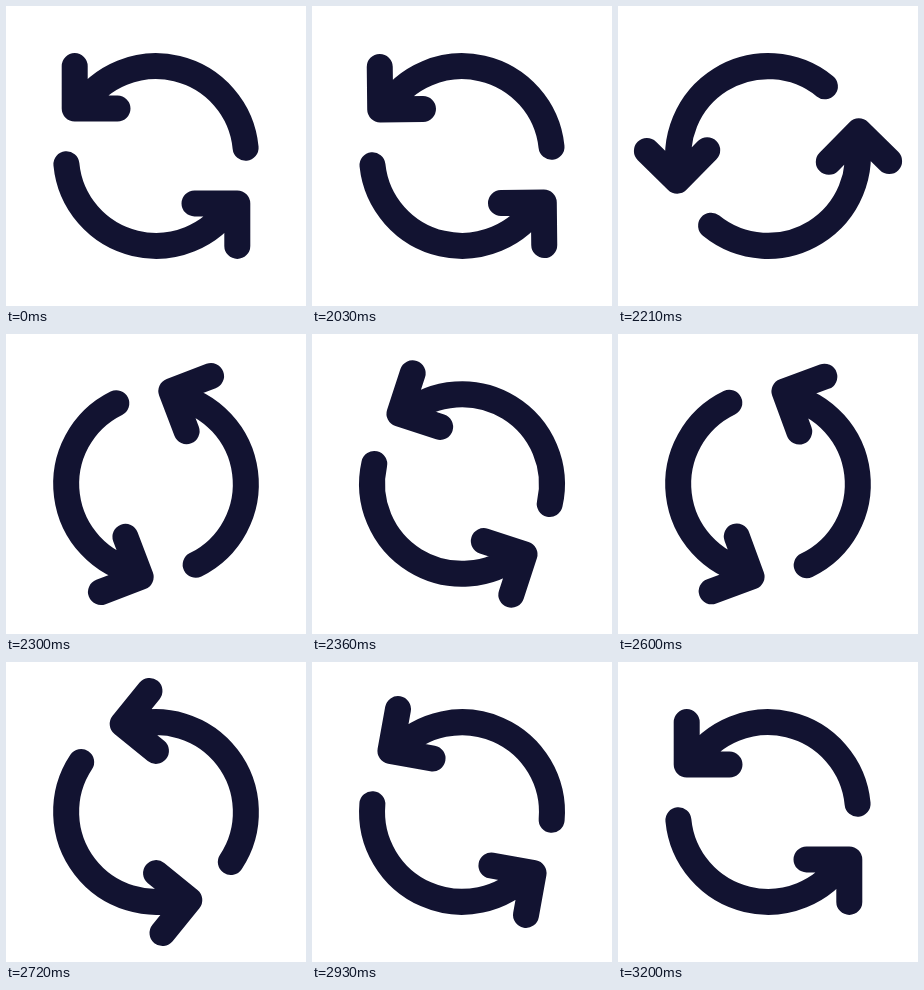
These frames come from a looping animation (300 px wide and 300 px high, 3.26 s). An HTML page:

```html
<!DOCTYPE html>
<html lang="en">
<head>
<meta charset="utf-8">
<title>Refresh</title>
<style>
  html, body { margin: 0; height: 100%; overflow: hidden; background: #fff; }
  svg { display: block; width: 100vw; height: 100vh; }
  #icon { fill: none; stroke: #121331; stroke-width: 26; stroke-linecap: round; stroke-linejoin: round; }
</style>
</head>
<body>
<svg viewBox="0 0 300 300">
  <g id="icon">
    <path id="arrow" d="M239.6 141.7A90 90 0 0 0 74 102M68.7 60.1V102.6H111.5"/>
    <use href="#arrow" transform="rotate(180 150 150)"/>
  </g>
</svg>
<script>
  const LOOP = 3260, START = 2000, STEP = 30, STEPS = 40;
  const icon = document.getElementById('icon');

  const bezier = (s, a, b) => 3 * (1 - s) ** 2 * s * a + 3 * (1 - s) * s * s * b + s ** 3;

  // cubic-bezier(.362, 0, .156, 1), solved by bisection
  function ease(x) {
    if (x <= 0) return 0;
    if (x >= 1) return 1;
    let low = 0, high = 1;
    for (let i = 0; i < 30; i++) {
      const mid = (low + high) / 2;
      if (bezier(mid, 0.362, 0.156) < x) low = mid; else high = mid;
    }
    return bezier(low, 0, 1);
  }

  // One counter-clockwise turn in discrete steps after a pause
  function draw(now) {
    const step = Math.floor((now % LOOP - START) / STEP);
    icon.setAttribute('transform', `rotate(${-360 * ease(step / STEPS)} 150 150)`);
    requestAnimationFrame(draw);
  }

  draw(0);
</script>
</body>
</html>
```
